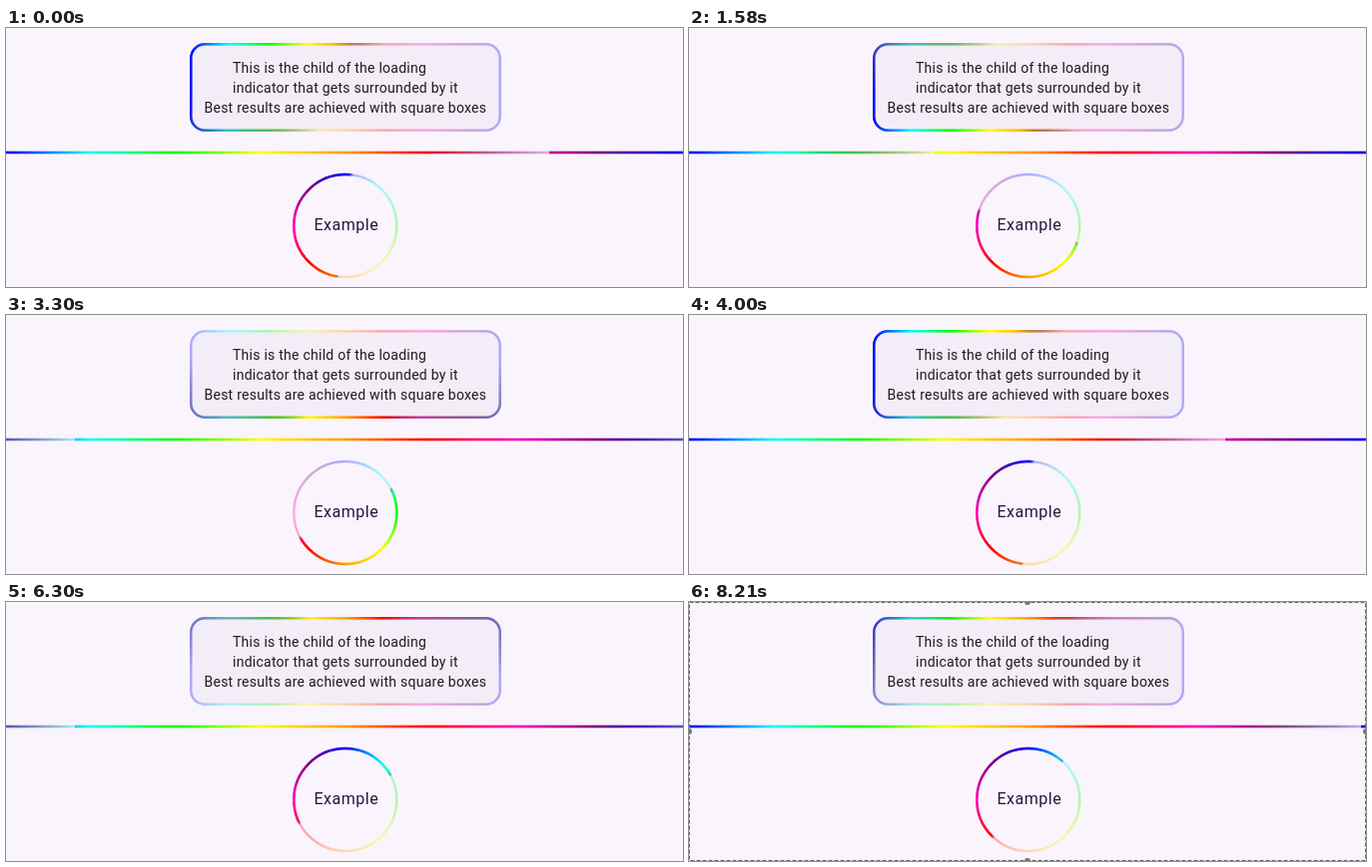
An HTML page with a canvas that plays this animation: 678x260 px, repeating every 8240 ms.

```html
<!DOCTYPE html>
<html lang="en">
<head>
<meta charset="utf-8">
<title>Rainbow loading borders</title>
<style>
  html, body { margin: 0; width: 678px; height: 260px; overflow: hidden; background: #faf4fc; }
  canvas, svg { position: absolute; left: 0; top: 0; display: block; }
  text { font-family: Roboto, Arial, sans-serif; }
  .body { font-size: 14px; letter-spacing: .25px; fill: #1d1b20; }
  .label { font-size: 16px; letter-spacing: .5px; fill: #21173f; }
  .frame { fill: none; stroke: #6b676d; stroke-dasharray: 4 2; }
</style>
</head>
<body>
<canvas id="stage" width="678" height="260"></canvas>
<svg width="678" height="260">
  <g class="body">
    <text x="227" y="45">This is the child of the loading</text>
    <text x="227" y="65">indicator that gets surrounded by it</text>
    <text x="198.5" y="85">Best results are achieved with square boxes</text>
  </g>
  <text class="label" x="308.5" y="203">Example</text>
  <g id="selection" visibility="hidden">
    <rect class="frame" x=".5" y=".5" width="677" height="259"/>
    <g fill="#77737a">
      <circle cx="339" cy="0" r="3"/><circle cx="339" cy="260" r="3"/>
      <circle cx="0" cy="130" r="3"/><circle cx="678" cy="130" r="3"/>
    </g>
  </g>
</svg>
<script>
const W = 678, H = 260, LOOP = 8240, STEP = 30;
const SELECT_AT = 7450;
const TRACK_ALPHA = 0.3;
const COLORS = ['#0000ff', '#00ffff', '#00ff00', '#ffff00', '#ffa000',
                '#ff0000', '#ff00c0', '#800080', '#0000ff'];

const ctx = document.getElementById('stage').getContext('2d');
const layer = document.createElement('canvas');
layer.width = W;
layer.height = H;
const lctx = layer.getContext('2d');
const selection = document.getElementById('selection');

// Angles are in degrees, clockwise from the top.
const conic = (deg, x, y) => ctx.createConicGradient((deg - 90) * Math.PI / 180, x, y);
const linear = (x0, x1) => ctx.createLinearGradient(x0, 0, x1, 0);

function rainbow(gradient) {
  COLORS.forEach((c, i) => gradient.addColorStop(i / (COLORS.length - 1), c));
  return gradient;
}

function fade(gradient, stops, invert) {
  for (const [at, a] of stops) {
    gradient.addColorStop(at, `rgba(0,0,0,${invert ? 1 - a : a})`);
  }
  return gradient;
}

const degrees = list => list.map(([deg, a]) => [deg / 360, a]);

const boxPath = new Path2D();
boxPath.roundRect(185.25, 16.25, 309.5, 86.5, 14);
const ringPath = new Path2D();
ringPath.arc(339.8, 198.5, 51.5, 0, 2 * Math.PI);
const linePath = new Path2D();
linePath.moveTo(0, 125);
linePath.lineTo(W, 125);

const shapes = [
  {
    path: boxPath,
    paint: rainbow(linear(184, 496)),
    stops: degrees([[0, 0], [56, 1], [134, 1], [190, 0], [360, 0]]),
    mask: t => conic(212 + 180 * t, 340, 59.5)
  },
  {
    path: linePath,
    paint: rainbow(linear(0, W)),
    stops: [[0, 1], [.4, 1], [.5, 0], [.5, 1], [.9, 1], [1, 0]],
    mask: t => {
      const p = (0.802 + t) % 1;
      return linear((p - 1) * W, (p + 1) * W);
    }
  },
  {
    path: ringPath,
    paint: rainbow(conic(0, 339.8, 198.5)),
    stops: degrees([[0, 0], [5, 1], [177, 1], [182, 0], [360, 0]]),
    mask: t => conic(187 + 180 * t, 339.8, 198.5)
  }
];

function fillLayer(mode, style) {
  lctx.globalCompositeOperation = mode;
  lctx.fillStyle = style;
  lctx.fillRect(0, 0, W, H);
}

function drawShape({ path, paint, stops, mask }, t) {
  ctx.lineWidth = lctx.lineWidth = 2.5;
  ctx.strokeStyle = lctx.strokeStyle = paint;
  ctx.globalAlpha = TRACK_ALPHA;
  ctx.stroke(path);
  ctx.globalAlpha = 1;

  // The bright part darkens while it turns transparent.
  lctx.globalCompositeOperation = 'source-over';
  lctx.clearRect(0, 0, W, H);
  lctx.stroke(path);
  fillLayer('source-atop', fade(mask(t), stops, true));
  fillLayer('destination-in', fade(mask(t), stops, false));
  ctx.drawImage(layer, 0, 0);
}

function render(ms) {
  const t = ms / 1000;
  ctx.fillStyle = '#faf4fc';
  ctx.fillRect(0, 0, W, H);
  ctx.fillStyle = '#f3edf7';
  ctx.fill(boxPath);
  shapes.forEach(s => drawShape(s, t));
  selection.setAttribute('visibility', ms >= SELECT_AT ? 'visible' : 'hidden');
}

const start = performance.now();
function tick() {
  const ms = Math.max(0, performance.now() - start) % LOOP;
  render(Math.floor(ms / STEP) * STEP);
  requestAnimationFrame(tick);
}
tick();
</script>
</body>
</html>
```
